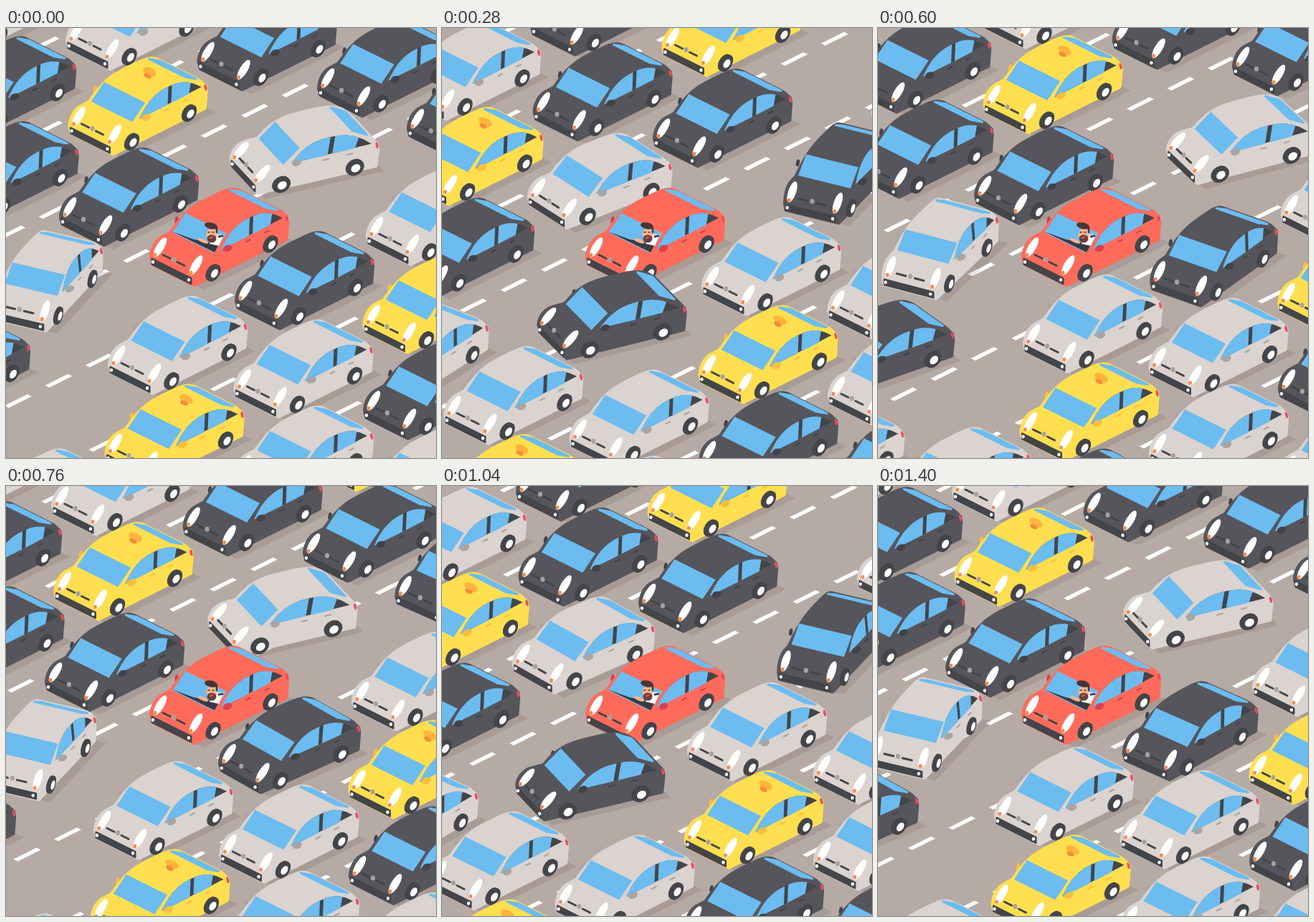
These frames come from a looping animation (600x600 px, 1440 ms). An HTML page with a canvas:

```html
<!DOCTYPE html>
<html lang="en">
<head>
<meta charset="utf-8">
<title>Traffic</title>
<style>
html, body { margin: 0; width: 100%; height: 100%; overflow: hidden; background: #b6aaa4; }
canvas { display: block; width: 600px; height: 600px; }
</style>
</head>
<body>
<canvas id="stage" width="600" height="600"></canvas>
<script>
const ctx = document.getElementById('stage').getContext('2d');
const STEP = 40, STEPS = 18, CYCLE = STEP * STEPS, REPEAT = 360;
const ORIGIN = { x: 298, y: 306 };
const ROAD = '#b6aaa4', GLASS = '#6cbcf0', TRIM = '#434549', WHITE = '#fff';
const SKIN = '#f7b58f', HAIR = '#4a3434';

const PAINT = {
  dark: { body: '#55555b', shade: '#424348' },
  grey: { body: '#dad3cf', shade: '#aaa4a2' },
  yellow: { body: '#ffdf50', shade: '#fbbd3c' },
  red: { body: '#ff6b5b', shade: '#d9404f' }
};

// Cars in a lane follow each other at half the repeat distance.
const LANES = [
  { lane: -4, start: 183, paints: ['grey'] },
  { lane: -3, start: 63, paints: ['dark', 'grey'] },
  { lane: -2, start: -54, paints: ['dark', 'yellow'] },
  { lane: -1, start: -7, paints: ['dark'] },
  { lane: 1, start: -180, paints: ['grey'] },
  { lane: 2, start: -125, paints: ['grey', 'yellow'] },
  { lane: 3, start: -245, paints: ['grey', 'dark'] },
  { lane: 4, start: -185, paints: ['grey', 'dark'] }
];

const range = (n, make) => Array.from({ length: n + 1 }, (_, i) => make(i / n));
const mix = (from, to, u) => from + (to - from) * u;

// Car shape in (along, across, height); the front is at negative along.
const arch = (a, middle, reach, power) => 1 - Math.abs((a - middle) / reach) ** power;
const roof = a => 22 + 28 * arch(a, 14, 52, 3.5);
const windowTop = a => 26 + 20.5 * arch(a, 15, 44, 2.4);
const halfWidth = (a, h) => 31 - 2.5 * (a / 67) ** 4 - 0.22 * Math.max(0, h - 24);
const side = (a, h) => [a, halfWidth(a, h), h];
const bothSides = (a, h) => [side(a, h), [a, -halfWidth(a, h), h]];
const panel = ([a1, h1], [a2, h2], half) =>
  [[a1, -half, h1], [a1, half, h1], [a2, half, h2], [a2, -half, h2]];

const LOWER = [
  ...bothSides(-64, -6), ...bothSides(64, -6),
  ...range(6, u => {
    const c = Math.cos(u * Math.PI / 2), s = Math.sin(u * Math.PI / 2);
    return [...bothSides(-51 - 16 * c, 5 + 19 * s), ...bothSides(57 + 9 * c, 16 + 12 * s)];
  }).flat()
];
const CABIN = range(16, u => mix(-37, 65, u)).flatMap(a => bothSides(a, roof(a)));
const WINDSHIELD = panel([-19, 43], [-37, 25], 28.7);
const REAR_GLASS = panel([40, roof(40)], [56, roof(56)], 25);
const BUMPER = panel([-67, -4], [-67, 4], 27.5);
const SHADOW = panel([-62, -8], [68, -8], 30).map(([a, b, h]) => [a, b + 10, h]);

function sideWindow(from, to, lean) {
  const top = range(10, u => mix(from, to, u)).map(a => side(a, windowTop(a)));
  return [...top, side(to - lean, 26), side(Math.max(from - lean, -28), 26)];
}
const SIDE_TRIM = sideWindow(-28, 59, 0);
const PANES = [sideWindow(-28, 16, 5.5), sideWindow(21, 46, 5.5)];

function project(car, [a, b, h]) {
  const c = Math.cos(car.yaw), s = Math.sin(car.yaw);
  const along = car.a + a * c - b * s, across = car.b + a * s + b * c;
  return [ORIGIN.x + along + across, ORIGIN.y + (across - along) / 2 - h];
}

function hull(points) {
  const sorted = [...points].sort((p, q) => p[0] - q[0] || p[1] - q[1]);
  const half = list => {
    const out = [];
    for (const p of list) {
      while (out.length > 1) {
        const [o, q] = out.slice(-2);
        if ((q[0] - o[0]) * (p[1] - o[1]) - (q[1] - o[1]) * (p[0] - o[0]) > 0) break;
        out.pop();
      }
      out.push(p);
    }
    return out.slice(0, -1);
  };
  return [...half(sorted), ...half(sorted.reverse())];
}

function trace(points) {
  points.forEach(([x, y], i) => i ? ctx.lineTo(x, y) : ctx.moveTo(x, y));
  ctx.closePath();
}

function fill(points, color, rounding = 0) {
  ctx.beginPath();
  trace(points);
  ctx.fillStyle = ctx.strokeStyle = color;
  ctx.fill();
  if (rounding) {
    ctx.lineWidth = rounding;
    ctx.stroke();
  }
}

function line(points, color, width) {
  ctx.beginPath();
  points.forEach(([x, y]) => ctx.lineTo(x, y));
  ctx.strokeStyle = color;
  ctx.lineWidth = width;
  ctx.stroke();
}

function oval(x, y, rx, ry, color, turn = 0) {
  ctx.beginPath();
  ctx.ellipse(x, y, rx, ry, turn, 0, Math.PI * 2);
  ctx.fillStyle = color;
  ctx.fill();
}

// An ellipse whose long axis runs between two points.
function lens([x1, y1], [x2, y2], width, color) {
  const dx = x2 - x1, dy = y2 - y1;
  oval((x1 + x2) / 2, (y1 + y2) / 2, Math.hypot(dx, dy) / 2, width, color, Math.atan2(dy, dx));
}

function drawDriver() {
  fill([[232, 284], [262, 295], [297, 302], [291, 313]], '#3b3a40');
  fill([[290, 288], [304, 288], [297, 304], [284, 301]], WHITE);
  line([[297, 291], [302, 290]], TRIM, 3);
  oval(287, 288, 7.5, 9, SKIN);
  oval(287, 294, 6.5, 5.5, '#6a4038');
  oval(286, 276, 9, 4.5, HAIR, 0.2);
  line([[294, 279], [294, 285]], HAIR, 2.5);
  line([[285, 293], [288, 292]], '#f05a50', 2);
  for (const x of [283, 289]) line([[x - 1, 285], [x + 1, 285]], HAIR, 1.5);
  lens([268, 294], [282, 300], 2.5, SKIN);
}

function drawWheel(at, a) {
  const disc = (r, b) => range(24, u => u * Math.PI * 2)
    .map(turn => [a + r * Math.cos(turn), b, 1.12 * r * Math.sin(turn)]);
  fill(hull([...at(disc(9.7, 30)), ...at(disc(9.7, 32))]), TRIM);
  fill(at(disc(5, 33)), WHITE);
}

function drawFront(at, dot) {
  fill(at(BUMPER), TRIM, 2);
  for (const flank of [-1, 1]) {
    const b = flank * 25;
    dot([-67, b - 1, 0], 2.2, 2.4, WHITE);
    line(at([[-64, flank * 5, 14], [-64, flank * 15, 14]]), TRIM, 3);
    lens(...at([[-50, b, 26], [-66, b, 7]]), 5.5, WHITE);
    dot([-65, b, 9.5], 2.4, 2.8, '#f98a4b');
  }
  dot([-64, 0, 15], 3, 3.5, '#aaa19e');
}

function drawCar(car) {
  const { body, shade } = PAINT[car.paint];
  const at = points => points.map(p => project(car, p));
  const dot = (point, ...look) => oval(...project(car, point), ...look);

  dot([-25, -35, 33], 2.5, 5, shade, 0.2);
  fill(hull(at(LOWER)), body, 5);
  fill(hull(at(CABIN)), body, 5);
  fill(at(REAR_GLASS), GLASS, 3);
  fill(at(WINDSHIELD), GLASS);
  if (car.paint === 'red') drawDriver();

  fill(at(SIDE_TRIM), TRIM);
  for (const pane of PANES) fill(at(pane), GLASS);
  for (const a of [8, 34]) line(at([[a - 3, 32, 21], [a + 3, 32, 21]]), shade, 2);
  dot([65, 29, 22], 1.8, 4.5, '#ef4a5c', -0.2);
  for (const a of [-40, 40]) drawWheel(at, a);
  dot([-26, 37, 30], 6.5, 4.5, shade, -0.4);
  drawFront(at, dot);

  if (car.paint === 'yellow') {
    lens(...at([[16, -9, 54], [16, 9, 54]]), 5.5, '#ffb43c');
    lens(...at([[12, -4, 51], [12, 6, 51]]), 3, '#f98a38');
  }
}

function drawDashes(step) {
  const gap = 56.5, drift = step * gap * 4 / STEPS;
  const shape = panel([-16, 0], [16, 0], 3);
  for (let lane = -4; lane <= 5; lane++) {
    const across = lane * 120 - 46;
    const phase = (drift + across * 0.037 - 1.3) % gap;
    for (let i = -14; i <= 14; i++) {
      const dash = { a: i * gap + phase - across, b: across, yaw: 0 };
      fill(shape.map(p => project(dash, p)), WHITE);
    }
  }
}

// Cars that swing out of the middle lane, pass, and swing back in.
function passer(time, flank, paint) {
  const angle = Math.max(-Math.PI, Math.min(Math.PI, Math.PI * time / CYCLE));
  return {
    a: -time / 2 - 1,
    b: flank * 60 * (1 + Math.cos(angle)),
    yaw: flank * 0.35 * Math.sin(angle),
    paint
  };
}

function carsAt(time) {
  const cars = [{ a: 0, b: 0, yaw: 0, paint: 'red' }];
  for (let k = -3; k <= 3; k++) {
    for (const { lane, start, paints } of LANES) {
      paints.forEach((paint, i) => cars.push({
        a: start + (k + i / 2) * REPEAT - time / 2, b: lane * 120.5 + 1.5, yaw: 0, paint
      }));
    }
    cars.push(passer(time + k * CYCLE, 1, 'dark'));
    cars.push(passer(time + (k - 0.5) * CYCLE, -1, 'grey'));
  }
  return cars.sort((p, q) => (p.b - p.a) - (q.b - q.a));
}

function draw(step) {
  ctx.fillStyle = ROAD;
  ctx.fillRect(0, 0, 600, 600);
  ctx.lineJoin = ctx.lineCap = 'round';
  drawDashes(step);
  const cars = carsAt(step * STEP);
  ctx.beginPath();
  for (const car of cars) trace(SHADOW.map(p => project(car, p)));
  ctx.fillStyle = 'rgba(60, 40, 35, 0.11)';
  ctx.fill();
  cars.forEach(drawCar);
}

let start;
function tick(now) {
  start ??= now;
  draw(Math.floor((now - start) / STEP) % STEPS);
  requestAnimationFrame(tick);
}
draw(0);
requestAnimationFrame(tick);
</script>
</body>
</html>
```
